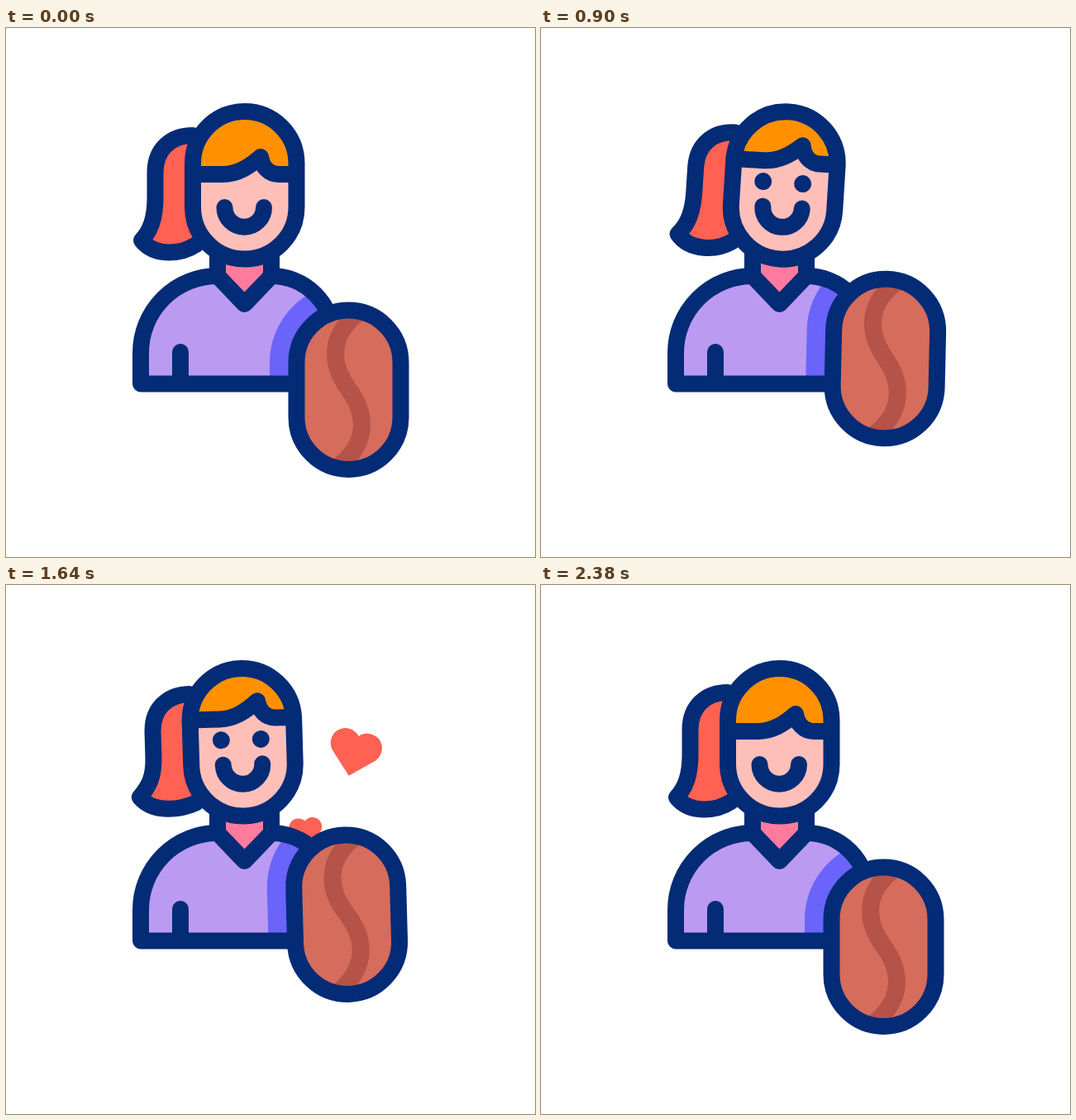
These frames come from a looping animation (640 by 640 pixels, 3340 ms). An HTML page:

```html
<!DOCTYPE html>
<html lang="en">
<head>
<meta charset="utf-8">
<title>Girl with coffee bean</title>
<style>
html, body { margin: 0; width: 100%; height: 100%; overflow: hidden; background: #fff; }
svg { display: block; width: 100vw; height: 100vh; }
.line { fill: none; stroke: #032b76; stroke-width: 20; stroke-linecap: round; stroke-linejoin: round; }
</style>
</head>
<body>
<svg viewBox="0 0 640 640">
  <defs>
    <path id="torso" d="M163 430.5V393A93 93 0 0 1 256 300L288.5 334L321 300A75 75 0 0 1 396 375V430.5Z"/>
    <rect id="skull" x="226" y="101" width="125.5" height="178.5" rx="62.75"/>
    <rect id="shell" x="351.5" y="341.5" width="126" height="192.5" rx="63"/>
    <path id="heart" fill="#ff6152" d="M0 44L-41 5A28 28 0 0 1-41-33A28 28 0 0 1 0-32A28 28 0 0 1 41-33A28 28 0 0 1 41 5Z"/>
    <clipPath id="torsoClip"><use href="#torso"/></clipPath>
    <clipPath id="skullClip"><use href="#skull"/></clipPath>
    <clipPath id="shellClip"><use href="#shell"/></clipPath>
  </defs>

  <use id="heartA" href="#heart"/>
  <use id="heartB" href="#heart"/>

  <g id="body">
    <path fill="#ff7b9e" d="M256 270H321V301L288.5 334L256 301Z"/>
    <use href="#torso" fill="#bb9af2"/>
    <g clip-path="url(#torsoClip)">
      <g id="shade"><rect x="319" y="309" width="191" height="257.5" rx="95.5" fill="#6a64fa"/></g>
    </g>
    <path class="line" d="M211 392V430"/>
    <use href="#torso" class="line"/>
    <path class="line" d="M256 272V300M321 272V300"/>
  </g>

  <g id="head">
    <path id="tail" class="line" style="fill:#ff6152"/>
    <use href="#skull" fill="#ffbfb9"/>
    <g clip-path="url(#skullClip)">
      <path id="hair" fill="#ff9100" d="M226 177H262C280 177 294 168 308 156C310 168 318 177 330 177H352V80H226Z"/>
    </g>
    <path id="fringe" class="line" d="M226 177H262C280 177 294 168 308 156C310 168 318 177 330 177H351"/>
    <use href="#skull" class="line"/>
    <g id="eyes" fill="#032b76">
      <circle cx="263" cy="187" r="10.5"/>
      <circle cx="311" cy="187" r="10.5"/>
    </g>
    <path class="line" d="M264.5 217a23.75 23.75 0 0 0 47.5 0"/>
  </g>

  <g id="bean">
    <use href="#shell" fill="#d56c5c"/>
    <g clip-path="url(#shellClip)">
      <path fill="none" stroke="#b55348" stroke-width="21" d="M426 345C390 373 393 408 414.5 437S439 501 403 530"/>
    </g>
    <use href="#shell" class="line"/>
  </g>
</svg>
<script>
const LOOP = 3340;
const $ = id => document.getElementById(id);
const move = (id, value) => $(id).setAttribute('transform', value);
const fade = (id, value) => $(id).setAttribute('opacity', value);

// Smooth step from 0 to 1 between times a and b.
function ease(t, a, b) {
  const u = Math.min(1, Math.max(0, (t - a) / (b - a)));
  return (1 - Math.cos(Math.PI * u)) / 2;
}
// Rises over a..b, falls over c..d.
const pulse = (t, a, b, c, d) => ease(t, a, b) - ease(t, c, d);

// The loose end of the ponytail hangs d lower.
function tailPath(d) {
  const p = (x, y) => `${x + 0.4 * d} ${y + d} `;
  return `M226 130C199 130 180.5 147 180.5 175V205C180.5 230 ${p(175, 245)}${p(164, 257)}` +
    `C${p(180, 277)}${p(212, 274)}230 262`;
}

// Rises, grows and turns with age, then fades.
function setHeart(id, age) {
  const n = age - 300;
  fade(id, age > 0 ? Math.min(1, Math.max(0, (910 - age) / 110)) : 0);
  move(id, `translate(${378 + 0.128 * n} ${274 - 0.208 * n}) ` +
    `rotate(${19 * ease(n, 0, 340) - 5}) scale(${(46 + 0.05 * n) / 97})`);
}

function draw(t) {
  const lift = -39.5 * (pulse(t, 300, 490, 840, 1290) + pulse(t, 1360, 1660, 2040, 2380));
  const tilt = 4.6 * ease(t, 300, 700) - 6.2 * ease(t, 760, 1030) + 1.6 * ease(t, 1640, 2040);
  const hold = `translate(0 ${lift}) rotate(${tilt} 414.5 522)`;
  move('bean', hold);
  move('shade', hold);

  const nod = 3.6 * ease(t, 480, 880) - 5.3 * ease(t, 880, 1680) + 1.7 * ease(t, 1680, 2240);
  move('head', `rotate(${nod} 288.5 278)`);

  const swinging = t > 1115 && t < 2225;
  $('tail').setAttribute('d', tailPath(swinging ? 4 * Math.cos(2 * Math.PI * (t - 1300) / 740) : 0));

  const brow = `translate(0 ${-15.3 * pulse(t, 300, 460, 2060, 2380)})`;
  move('hair', brow);
  move('fringe', brow);
  fade('eyes', pulse(t, 310, 450, 1990, 2130));

  setHeart('heartA', t - 1000);
  setHeart('heartB', t - 1460);
}

const start = performance.now();
function tick() {
  draw((performance.now() - start) % LOOP);
  requestAnimationFrame(tick);
}
draw(0);
requestAnimationFrame(tick);
</script>
</body>
</html>
```
